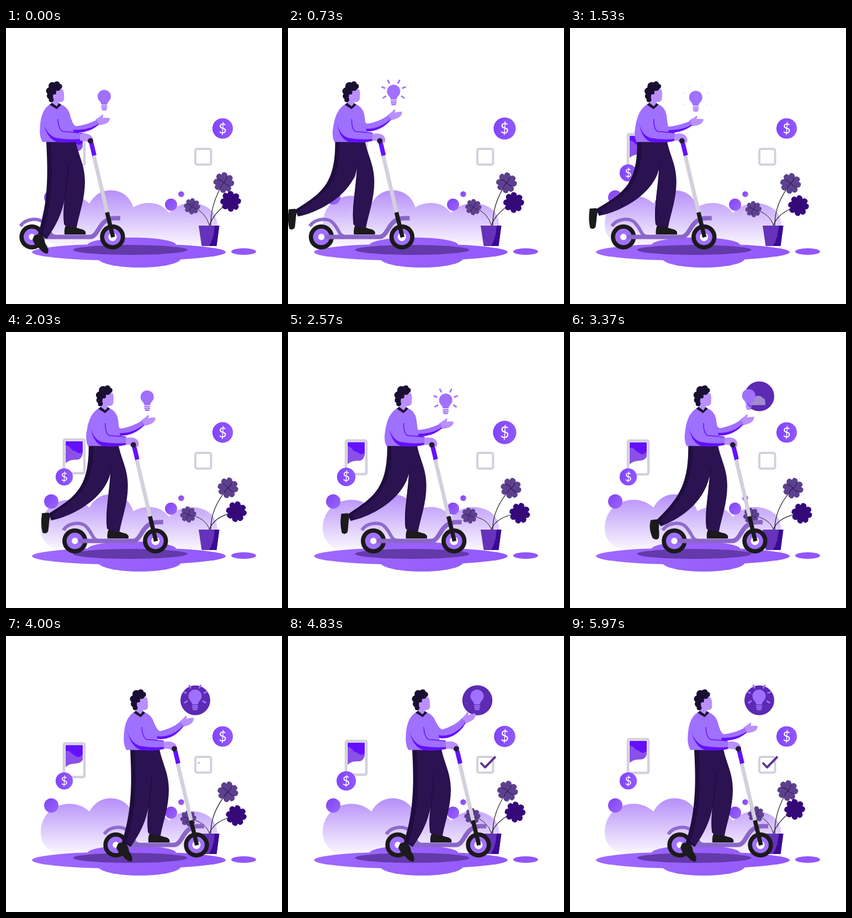
Recreate the animation shown at these times as an HTML page with a canvas. Size 500 by 500 pixels, loop 6 s.

```html
<!DOCTYPE html>
<html lang="en">
<head>
<meta charset="utf-8">
<title>Scooter rider</title>
<style>
html, body { margin: 0; width: 100%; height: 100%; overflow: hidden; background: #fff; }
canvas { display: block; width: 500px; height: 500px; }
</style>
</head>
<body>
<canvas id="stage" width="500" height="500"></canvas>
<script>
const c = document.getElementById('stage').getContext('2d');
const LOOP = 6000, TAU = Math.PI * 2;
const LILAC = '#a070ff', VIVID = '#6410ff', SKIN = '#ba8fff', INK = '#1a0f33',
      BLACK = '#1b1a1c', GREY = '#d3d0dc', PANTS = '#2a1350', DEEP = '#1f0d3e', DECK = '#8b66c9';

// ---- timing helpers ----
const clamp = x => Math.max(0, Math.min(1, x));
const ease = x => { x = clamp(x); return x * x * (3 - 2 * x); };
const span = (t, a, b) => ease((t - a) / (b - a));
const lerp = (a, b, p) => a + (b - a) * p;
function keys(t, list) {
  for (let i = 1; i < list.length; i++) {
    const [t0, v0] = list[i - 1], [t1, v1] = list[i];
    if (t <= t1) return lerp(v0, v1, span(t, t0, t1));
  }
  return list[list.length - 1][1];
}
const pulse = t => {
  t = (t + LOOP) % 2000;
  return t < 1000 ? Math.sin(Math.PI * t / 1000) ** 2 : 0;
};
const legBack = t => keys(t, [[0, 0], [780, 1], [1150, 1.08], [1700, 1], [3080, .96], [4000, 0]]);
const armLift = t => keys(t, [[0, 0], [800, .5], [1500, -.1], [2100, .35], [2750, -.05],
                              [3600, .5], [4750, 1], [5850, 0]]);

// ---- drawing helpers ----
function fill(path, color) { c.fillStyle = color; c.fill(new Path2D(path)); }
function line(path, color, width, cap = 'butt') {
  c.strokeStyle = color; c.lineWidth = width; c.lineCap = cap; c.lineJoin = 'round';
  c.stroke(new Path2D(path));
}
function oval(x, y, rx, color, ry = rx) {
  c.fillStyle = color;
  c.beginPath(); c.ellipse(x, y, rx, ry, 0, 0, TAU); c.fill();
}
function box(x, y, w, h, r) { c.beginPath(); c.roundRect(x, y, w, h, r); }
function ramp(x0, y0, x1, y1, from, to) {
  const g = c.createLinearGradient(x0, y0, x1, y1);
  g.addColorStop(0, from); g.addColorStop(1, to);
  return g;
}
function at(x, y, draw, scale = 1, turn = 0) {
  c.save(); c.translate(x, y); c.rotate(turn); c.scale(scale, scale); draw(); c.restore();
}
// Blend two paths that share the same commands
function morph(a, b, p) {
  const to = b.match(/-?[\d.]+/g);
  let i = 0;
  return a.replace(/-?[\d.]+/g, n => lerp(+n, +to[i++], p).toFixed(2));
}

// ---- scenery ----
function cloud() {
  fill('M100 396C76 392 63 376 63 355C63 325 86 304 115 304Q136 304 151 318' +
    'Q165 294 189 294Q220 294 231 325Q242 317 259 317Q282 317 295 335Q312 317 338 317' +
    'Q382 321 383 360Q383 388 360 396Z', ramp(0, 292, 0, 398, '#b48cf9', '#fdfbff'));
}
function bubble(x, y, r) { oval(x, y, r, ramp(x - r, y - r, x + r, y + r, '#8242f2', '#9c66ff')); }

function coin(x, y, r) {
  at(x, y, () => {
    oval(0, 0, 18.5, ramp(-18, 0, 18, 0, '#8344fa', '#9158ff'));
    c.fillStyle = '#fff';
    c.font = '400 25px Lato, "Open Sans", sans-serif';
    c.textAlign = 'center'; c.textBaseline = 'alphabetic';
    c.fillText('$', 0, 8.5);
  }, r / 18.5);
}
function phone(y, t) {
  at(103, y, () => {
    box(2, 2, 37, 61, 2.5);
    c.fillStyle = '#fff'; c.fill();
    c.strokeStyle = GREY; c.lineWidth = 4.5; c.stroke();
    const w = 2 * Math.sin(t / LOOP * TAU * 2);
    c.save();
    box(5, 5, 31, 52, 0); c.clip();
    fill(`M5 5H36V${30 + w}C32 ${40 - w} 26 38 18 39Q10 40 5 45Z`, '#8a50e8');
    fill(`M5 5H36V${23 - w}C28 31 25 ${24 + w} 19 22C14 21 14 14 5 ${14 + w}Z`, VIVID);
    c.restore();
  });
}
function checkbox(t) {
  box(343, 219, 28.5, 28.5, 3.5);
  c.strokeStyle = GREY; c.lineWidth = 4; c.stroke();
  const p = span(t, 3950, 4500);
  if (!p) return;
  c.setLineDash([40 * p, 60]);
  line('M349 229.5L357 238L376 218.5', '#5b3592', 4);
  c.setLineDash([]);
}
function ground() {
  const g = ramp(47, 0, 453, 0, '#9f69ff', '#9155fa');
  oval(222.5, 406, 175.5, g, 15.5);
  oval(228, 393, 80, g, 13.5);
  oval(242, 417, 75, g, 17);
  oval(430.5, 405, 22.5, g, 6);
  oval(225, 402, 103.5, '#6439aa', 9);
}
function clover(x, y, size, turn, color) {
  at(x, y, () => {
    for (let i = 0; i < 4; i++) {
      fill('M0 1C-10 -4 -14 -15 -8 -17Q-3 -19 0 -14Q3 -19 8 -17C14 -15 10 -4 0 1Z', color);
      c.rotate(TAU / 4);
    }
    for (let i = 0; i < 4; i++) {
      line('M0 0Q2 -6 0 -12', PANTS, 1);
      c.rotate(TAU / 4);
    }
  }, size, turn);
}
function plant(sway) {
  const ax = 394.5 + 10 * sway, ay = 280 + 3 * sway,
        bx = 407 + 13.5 * sway, by = 314 + 15 * sway,
        dx = 337 - 9 * sway, dy = 323 + 10 * sway;
  line(`M371 359Q370 ${318 + 2 * sway} ${ax} ${ay}`, BLACK, 1.2);
  line(`M368 359Q376 334 ${bx} ${by}`, BLACK, 1.2);
  line(`M369 359Q362 ${333 + 4 * sway} ${dx} ${dy}`, BLACK, 1);
  clover(ax, ay, 1, .5 + .15 * sway, '#5d418f');
  clover(bx, by, 1, .4 + .25 * sway, '#36087d');
  clover(dx, dy, .78, .5 - .25 * sway, '#5d418f');
  fill('M349 358H386.500L381.500 395H354.500Z', '#6632bb');
  fill('M378 358H386.500L381.500 395H368Q377 380 378 358Z', '#3b0a93');
}

// ---- bulb and its badge ----
function badge(t) {
  const s = span(t, 2600, 3100);
  if (!s) return;
  at(343, 116.5, () => {
    oval(0, 0, 27 + pulse(t), '#5c2ab3');
    c.globalAlpha = span(t, 2950, 3150) * (1 - span(t, 3250, 3550));
    fill('M-18 16Q-18 9 -11 8Q-10 -1 -2 -1Q4 -1 6 3Q11 2 11 16Z', '#c9bfdd');
    c.globalAlpha = 1;
  }, s);
}
function rays(t) {
  const start = [300, 2050, 3600, 5300].find(s => t > s && t < s + 1310);
  if (start === undefined) return;
  const u = (t - start) / 1310;
  const outer = lerp(16, 23.5, ease(u / .35)), inner = lerp(16, 23.5, ease((u - .6) / .4));
  for (const deg of [28, 70, 122]) for (const side of [-1, 1]) {
    const a = side * deg * TAU / 360, s = Math.sin(a), k = -Math.cos(a);
    line(`M${s * inner} ${k * inner}L${s * outer} ${k * outer}`, LILAC, 2.8);
  }
}
function bulb(t, dx, lift) {
  const k = span(t, 3150, 4000);
  at(lerp(178 + dx, 342.5, k), lerp(124 - 19 * lift, 109, k), () => {
    fill('M-12 0a12 12 0 0 1 24 0c0 7 -6 9 -7 15h-10c-1 -6 -7 -8 -7 -15z', LILAC);
    line('M-4.500 17.500H4.500M-4.500 20.800H4.500', LILAC, 2.3, 'round');
    line('M-3 24H3', LILAC, 2.6, 'round');
    rays(t);
  });
}

// ---- rider ----
function wheel(x, hub) {
  oval(x, 378.5, 22.7, BLACK);
  oval(x, 378.5, 15, LILAC);
  oval(x, 378.5, hub, '#fff');
}
function scooter() {
  line('M26 359C36 344 60 343 69 354Q75 361 80 371Q84 378 92 378', '#8f6bce', 6);
  wheel(47, 5.7);
  line('M53 378.500H152C169 378 167 345 197 344.500H207', DECK, 8);
  wheel(193, 7.5);
  line('M159 231L184 337', GREY, 7);
  line('M183 334L194 379', BLACK, 7.5);
  line('M154.500 208L160 231', VIVID, 8);
}
function legs(p) {
  const back = morph(
    'M73 205C75 250 79 310 58 373L74 382C95 350 108 330 114 250L118 205Z',
    'M72 205C73 285 45 300 -1 329L4 341C48 332 104 298 112 252L118 205Z', p);
  fill(morph(
    'M51 376L60 373Q70 378 71 390Q79 401 76 408Q70 411 61 400Q50 392 48 383Z',
    'M-13 328L-1 327Q3 330 0 343Q-1 356 -2 361Q-6 367 -12 363Q-15 350 -14 338Z', p), BLACK);
  fill(back, DEEP);
  c.save();
  c.clip(new Path2D(back));
  c.translate(8, 0);
  fill(back, PANTS);
  c.restore();
  fill('M108 358L122 358Q128 363 139 365Q146 368 144 374H106Q105 365 108 358Z', BLACK);
  fill('M90 205H126C131 230 143 248 143 278C143 310 133 335 128 361Q116 362 106 357' +
    'C101 325 111 290 112 250Z', PANTS);
  line('M112.500 248C111 290 102 325 106 356', DEEP, 1.5);
}
function farArm(q, lean) {
  const down = low => `M111 147C118 163 121 179 128 178C142 176 154 172 164 167L168 ${175 - low * .4}` +
    `C155 ${187 - low} 138 ${191 - low} 117 ${189 - low}Z`;
  const up = low => `M111 147C118 160 123 171 129 169C140 166 156 158 163 149L170 ${157 - low * .4}` +
    `C160 ${176 - low} 140 ${190 - low} 117 ${184 - low}Z`;
  c.save();
  c.translate(-4 * lean, 0);
  at(lerp(164, 166, q), lerp(170, 153, q), () =>
    fill('M-2 -4C3 -8 7 -9 10 -13Q14 -13 11 -7Q18 -8 24 -7Q24 1 15 4Q8 6 2 6Z', SKIN),
    1, -.28 * q);
  fill(morph(down(0), up(0), q), VIVID);
  fill(morph(down(5), up(5), q), LILAC);
  c.restore();
}
function head() {
  fill('M86 108Q98 114 102 110Q106 117 105 123Q107 133 100 134L96 134Q97 139 92 144L83 138L84 124Z', SKIN);
  for (const [x, y, r] of [[92, 102, 5.5], [84, 105, 7], [79, 114, 6.5], [97, 106, 4.8],
                           [80, 123, 6], [82, 130, 4.5], [88, 109, 6], [94, 109, 5], [86, 117, 5]])
    oval(x, y, r, INK);
  oval(88, 123, 3, SKIN);
  fill('M79 139L83 135.500L92 142L96 136L100 139L92 147Z', INK);
}
function upperBody(q, lean) {
  const k = .087 * lean;
  c.save();
  c.transform(1, 0, -k, 1, 260 * k, 0);
  farArm(q, lean);
  fill('M80 138L92 146L99 138Q112 143 116 157L123 190L122 206.500H66Q60 196 61.500 180Q63 148 80 138Z', LILAC);
  head();
  fill('M67 168Q73 197 100 197L137 193V204Q118 209 95 207Q74 203 67 168Z', VIVID);
  fill('M66 165L96 166Q96 185 104 188L134 190Q137 196 135 201Q112 203 90 199Q72 193 66 165Z', LILAC);
  line('M94 165Q95 184 103 187.500L133 190', VIVID, 1.5);
  fill('M134 192Q146 189 154 195Q160 201 157 208L150 207Q144 204 134 204Z', SKIN);
  c.restore();
}

function draw(t) {
  const sway = Math.sin(Math.PI * t / LOOP) ** 2;
  const dx = 152 * span(t, 0, 4000), p = legBack(t), q = armLift(t), lean = Math.min(p, 1);
  c.fillStyle = '#fff';
  c.fillRect(0, 0, 500, 500);
  cloud();
  bubble(82, 307, 13);
  bubble(299, 320, 11);
  bubble(317.5, 301, 5.3);
  phone(185 + 10 * sway, t);
  coin(105.5, 262.5, 15.6 + 2 * pulse(t - 300));
  coin(392.5, 182, 18.6 + 2.7 * pulse(t));
  checkbox(t);
  ground();
  plant(sway);
  badge(t);
  c.save();
  c.translate(dx, 0);
  scooter();
  legs(p);
  upperBody(q, lean);
  oval(153, 204.5, 5, '#251a3c');
  c.restore();
  bulb(t, dx, q);
}

const begin = performance.now();
function frame() {
  draw((performance.now() - begin) % LOOP);
  requestAnimationFrame(frame);
}
frame();
</script>
</body>
</html>
```
